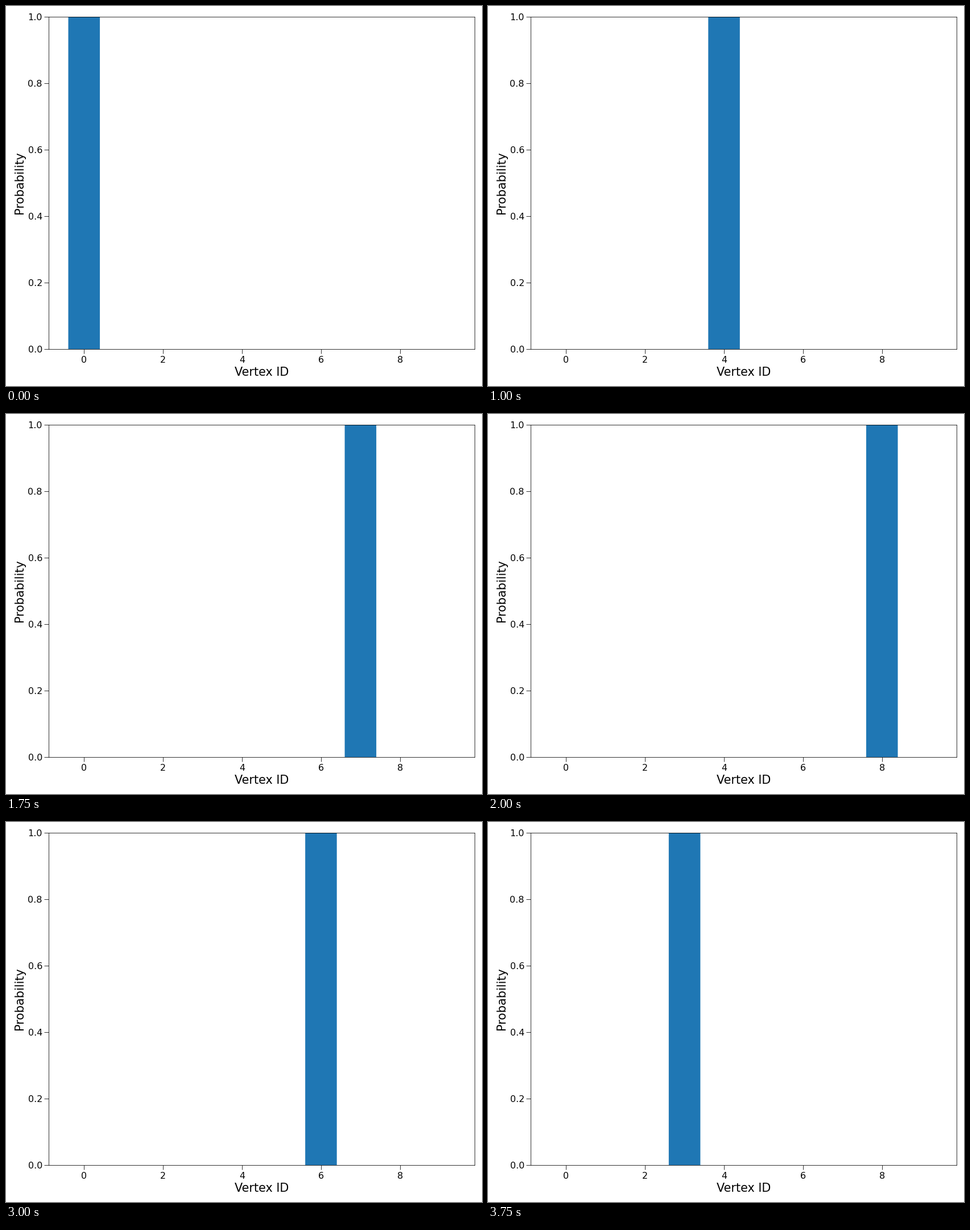
A matplotlib script that plays this animation: 837 px wide and 669 px high, repeating every 4000 ms.

```python
import matplotlib.pyplot as plt
from matplotlib.animation import FuncAnimation

W, H, DPI = 837, 669, 72
EPS = 1e-4  # guards the pixel size against rounding down
LEFT, BOTTOM, WIDTH, HEIGHT = 75.49, 65, 748.56, 585
BAR = 0.8
LAST = 9
FRAMES, INTERVAL = 16, 250

plt.rcParams.update({
    "font.family": "DejaVu Sans",
    "font.size": 12,
    "axes.labelsize": "xx-large",
    "xtick.labelsize": 16,
    "ytick.labelsize": 16,
})

fig = plt.figure(figsize=((W + EPS) / DPI, (H + EPS) / DPI), dpi=DPI,
                 facecolor="white")
ax = fig.add_axes([LEFT / W, BOTTOM / H, WIDTH / W, HEIGHT / H])
ax.set_xlim(-0.89, LAST + 0.89)
ax.set_ylim(0, 1)
ax.set_xticks(range(0, LAST + 1, 2))
ax.tick_params(length=8)
ax.set_xlabel("Vertex ID")
ax.set_ylabel("Probability")

bar = ax.bar([0], [1], width=BAR, color="#1f77b4", snap=False)[0]


def vertex(step):
    """Walk up the line of vertices and bounce back at its end."""
    return LAST - abs(LAST - step)


def update(step):
    bar.set_x(vertex(step) - BAR / 2)
    return (bar,)


anim = FuncAnimation(fig, update, frames=FRAMES, interval=INTERVAL,
                     init_func=lambda: update(0), repeat=True, blit=False)
plt.show()
```
